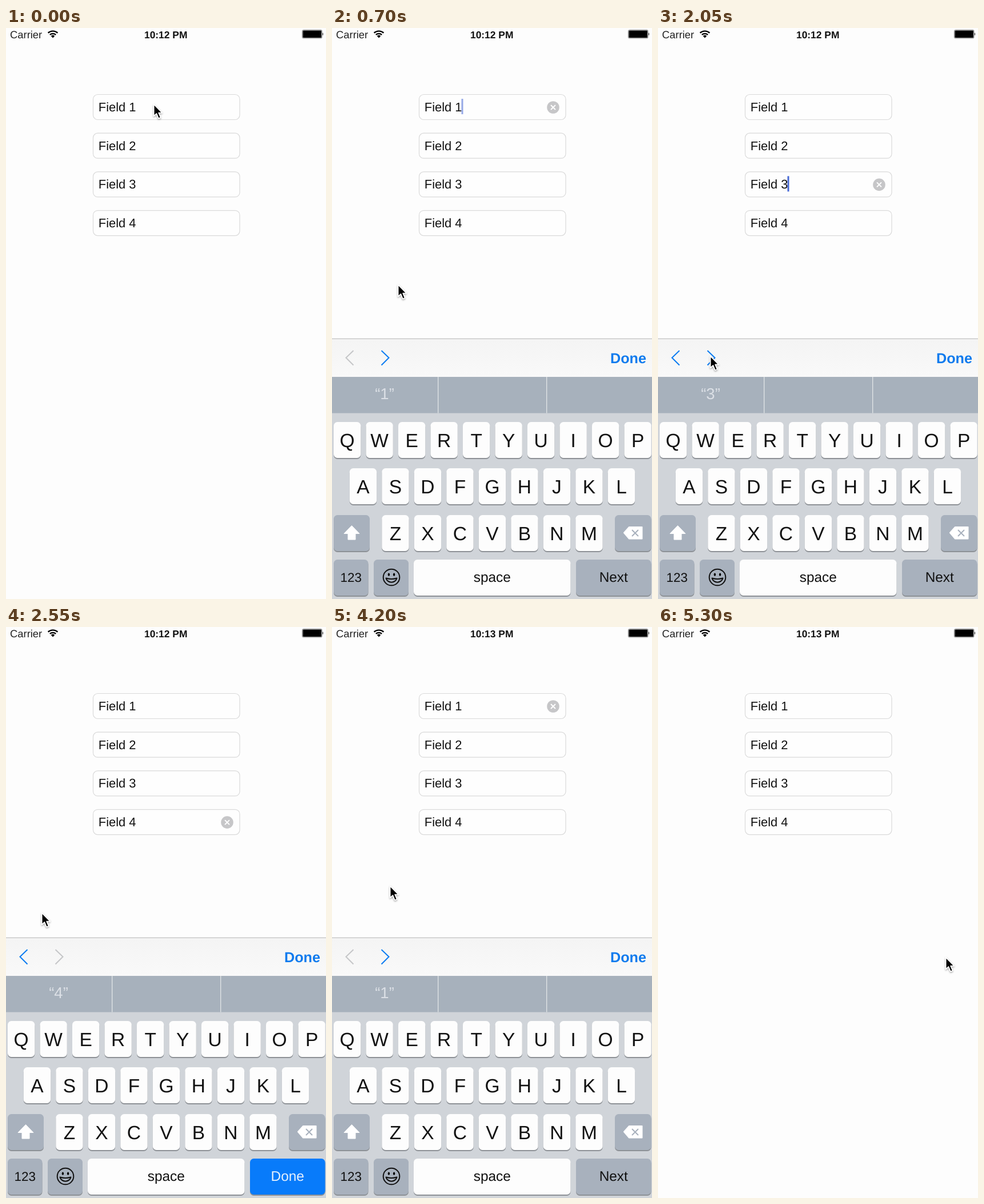
These frames come from a looping animation (560x1000 px, 5350 ms). An HTML page:

```html
<!DOCTYPE html>
<html lang="en">
<head>
<meta charset="utf-8">
<title>Form field navigation</title>
<style>
  html, body { margin: 0; width: 100%; height: 100%; overflow: hidden; background: #fdfdfd; }
  svg { display: block; width: 100vw; height: 100vh; font-family: "Liberation Sans", Arial, sans-serif; text-rendering: geometricPrecision; }
  .mid { text-anchor: middle; }
  .bold { font-weight: bold; }
  .line { fill: none; stroke-width: 2; }
</style>
</head>
<body>
<svg viewBox="0 0 560 1000">
  <defs>
    <linearGradient id="bar" x2="0" y2="1">
      <stop stop-color="#f4f4f4"/><stop offset="1" stop-color="#f9f9f9"/>
    </linearGradient>
    <filter id="soft" x="-50%" y="-50%" width="200%" height="200%">
      <feDropShadow dx="0" dy="1.5" stdDeviation="1.5" flood-opacity=".4"/>
    </filter>
  </defs>
  <rect width="560" height="1000" fill="#fdfdfd"/>

  <text x="7" y="17.8" font-size="18.4" fill="#222">Carrier</text>
  <g transform="translate(82 17.5)">
    <path d="M0 0L-3.2 -3.6A4.8 4.8 0 0 1 3.2 -3.6Z"/>
    <path class="line" stroke="#000" style="stroke-width:2.3" d="M-5.2 -5.6A7.6 7.6 0 0 1 5.2 -5.6M-8.4 -8.8A12.2 12.2 0 0 1 8.4 -8.8"/>
  </g>
  <text id="clock" class="mid bold" x="279.7" y="17.6" font-size="17.4" fill="#111"></text>
  <rect x="518.5" y="3.5" width="34.5" height="14.5" rx="2" fill="#fdfdfd" stroke="#777"/>
  <rect x="519.5" y="4.5" width="32.5" height="12.5" rx="1"/>
  <path d="M554 8q2 2.7 0 5.4z"/>

  <g id="fields"></g>
  <g id="focus">
    <rect id="caret" x="226.5" y="124" width="3" height="27" fill="#486ad6"/>
    <circle cx="387" cy="139" r="10.8" fill="#c6c6c8"/>
    <path class="line" stroke="#fff" d="M383 135l8 8m0 -8l-8 8"/>
  </g>

  <g id="board">
    <rect y="544" width="560" height="67.5" fill="url(#bar)"/>
    <rect y="543.5" width="560" height="1.5" fill="#cacaca"/>
    <path id="prev" class="line" d="M37.5 565L24.500 577.500L37.500 590.500"/>
    <path id="next" class="line" d="M86.500 565L99.500 577.500L86.500 590.500"/>
    <text class="bold" x="487" y="587.300" font-size="25.200" fill="#0f7bee">Done</text>
    <rect y="674" width="560" height="326" fill="#d0d4d9"/>
    <rect y="611" width="560" height="63.500" fill="#a7b1bc"/>
    <path stroke="#e2e5e9" stroke-width="1.300" d="M185.700 611v63.500M375.700 611v63.500"/>
    <text id="hint" class="mid" x="92" y="649.500" font-size="27.500" fill="#dce0e6"></text>
    <g id="keys"></g>
    <path fill="#fff" stroke="#fff" stroke-linejoin="round" d="M34.500 871.500L48 885.500H41V896H28V885.500H21Z"/>
    <path fill="#fff" stroke="#fff" stroke-width="2" stroke-linejoin="round" d="M511 884L520 874H542.500V894.500H520Z"/>
    <path class="line" stroke="#a8b1bd" d="M525 879l11 11m0 -11l-11 11"/>
    <g transform="translate(104 962)">
      <circle class="line" r="14.300" stroke="#111"/>
      <ellipse cx="-4.600" cy="-4.800" rx="1.700" ry="2.600"/>
      <ellipse cx="4.600" cy="-4.800" rx="1.700" ry="2.600"/>
      <path class="line" stroke="#111" stroke-linejoin="round" d="M-9.500 1.500Q0 4.500 9.500 1.500A9.700 9 0 0 1 -9.500 1.500Z"/>
    </g>
  </g>

  <path id="pointer" filter="url(#soft)" stroke="#fff" stroke-width="1.600" stroke-linejoin="round" d="M.7 .7V21.200L5.400 16.900L8.900 25.200L12.600 23.700L9.100 15.500H15.200Z"/>
</svg>
<script>
const LOOP = 5350, STEP = 50;
const FIELD_GAP = 67.7, BOARD_HEIGHT = 456;
const OPEN = 307, CLOSE = 4870, SLIDE = 350;
const BLUE = "#0c7cf2", GREY = "#c5c6c8", KEY_GREY = "#a8b1bd";
// [time, focused field]
const focusSteps = [[0, 0], [OPEN, 1], [1350, 2], [1800, 3], [2100, 4], [2900, 3], [3250, 2], [3600, 1], [CLOSE, 0]];
// [time, x, y]
const pointerPath = [
  [0, 258, 133], [400, 257, 133], [550, 257, 133], [700, 115, 449], [850, 91, 573],
  [2150, 91, 574], [2300, 84, 548], [2550, 62, 500], [2750, 28, 572], [3720, 28, 573],
  [3900, 70, 510], [4200, 101, 453], [4350, 101, 453], [4700, 490, 570], [4900, 499, 575], [5300, 503, 578]
];

const $ = id => document.getElementById(id);
const clamp = v => Math.max(0, Math.min(1, v));

function add(parent, tag, attrs, text = "") {
  const el = document.createElementNS("http://www.w3.org/2000/svg", tag);
  for (const name in attrs) el.setAttribute(name, attrs[name]);
  el.textContent = text;
  return parent.appendChild(el);
}

function addKey(x, y, width, label = "", size = 24.4, fill = "#fdfdfd") {
  const box = { x, y, width, height: 63, rx: 6.5 };
  add($("keys"), "rect", { ...box, y: y + 2, fill: "#8d9196" });
  const face = add($("keys"), "rect", { ...box, fill });
  const baseline = y + (size > 30 ? 43.5 : 38.5);
  const text = add($("keys"), "text", { class: "mid", x: x + width / 2, y: baseline, "font-size": size, fill: "#111" }, label);
  return { face, text };
}

for (let i = 0; i < 4; i++) {
  const y = 116.5 + i * FIELD_GAP;
  add($("fields"), "rect", { x: 152.5, y, width: 256.5, height: 44, rx: 8, fill: "#fefefe", stroke: "#dadada", "stroke-width": 1.2 });
  add($("fields"), "text", { x: 161.8, y: y + 29.3, "font-size": 21.9, fill: "#111" }, "Field " + (i + 1));
}
[["QWERTYUIOP", 3, 690], ["ASDFGHJKL", 30.8, 771], ["ZXCVBNM", 87.3, 853]].forEach(([row, x, y]) =>
  [...row].forEach((letter, i) => addKey(x + i * 56.5, y, 47.3, letter, 33.5)));
addKey(3, 853, 63, "", 24, KEY_GREY);
addKey(495, 853, 63.5, "", 24, KEY_GREY);
addKey(3, 931, 60.5, "123", 22.4, KEY_GREY);
addKey(73, 931, 61, "", 24, KEY_GREY);
addKey(143, 931, 274.5, "space");
const returnKey = addKey(427, 931, 131.5, "Next", 24.4, KEY_GREY);

const focusAt = t => focusSteps.findLast(([start]) => start <= t) || [0, 0];

function pointerAt(t) {
  const i = pointerPath.findIndex(p => p[0] > t);
  if (i < 0) return pointerPath.at(-1).slice(1);
  const [t0, x0, y0] = pointerPath[i - 1], [t1, x1, y1] = pointerPath[i];
  const k = (t - t0) / (t1 - t0);
  return [x0 + (x1 - x0) * k, y0 + (y1 - y0) * k];
}

function caretOpacity(age) {
  const phase = age % 900;
  return phase < 600 ? clamp((450 - phase) / 100) : clamp((phase - 650) / 100);
}

const slide = (t, start) => 1 - (1 - clamp((t - start) / SLIDE)) ** 3;

function draw(t) {
  const [since, field] = focusAt(t);
  const shown = slide(t, OPEN) - slide(t, CLOSE);
  const last = field === 4;

  $("clock").textContent = t < 3050 ? "10:12 PM" : "10:13 PM";
  $("focus").style.display = field ? "" : "none";
  $("focus").setAttribute("transform", `translate(0 ${(field - 1) * FIELD_GAP})`);
  $("caret").setAttribute("opacity", caretOpacity(t - since));

  $("board").setAttribute("transform", `translate(0 ${(1 - shown) * (BOARD_HEIGHT + 2)})`);
  $("prev").setAttribute("stroke", field > 1 ? BLUE : GREY);
  $("next").setAttribute("stroke", last ? GREY : BLUE);
  $("hint").textContent = `“${focusAt(t - 150)[1] || (t < 1000 ? 2 : 1)}”`;
  returnKey.face.setAttribute("fill", last ? "#087bfa" : KEY_GREY);
  returnKey.text.setAttribute("fill", last ? "#e6f1fd" : "#111");
  returnKey.text.textContent = last ? "Done" : "Next";

  $("pointer").setAttribute("transform", `translate(${pointerAt(t)})`);
}

const begin = performance.now();
function tick() {
  const t = (performance.now() - begin) % LOOP;
  draw(Math.floor(t / STEP) * STEP);
  requestAnimationFrame(tick);
}
tick();
</script>
</body>
</html>
```
